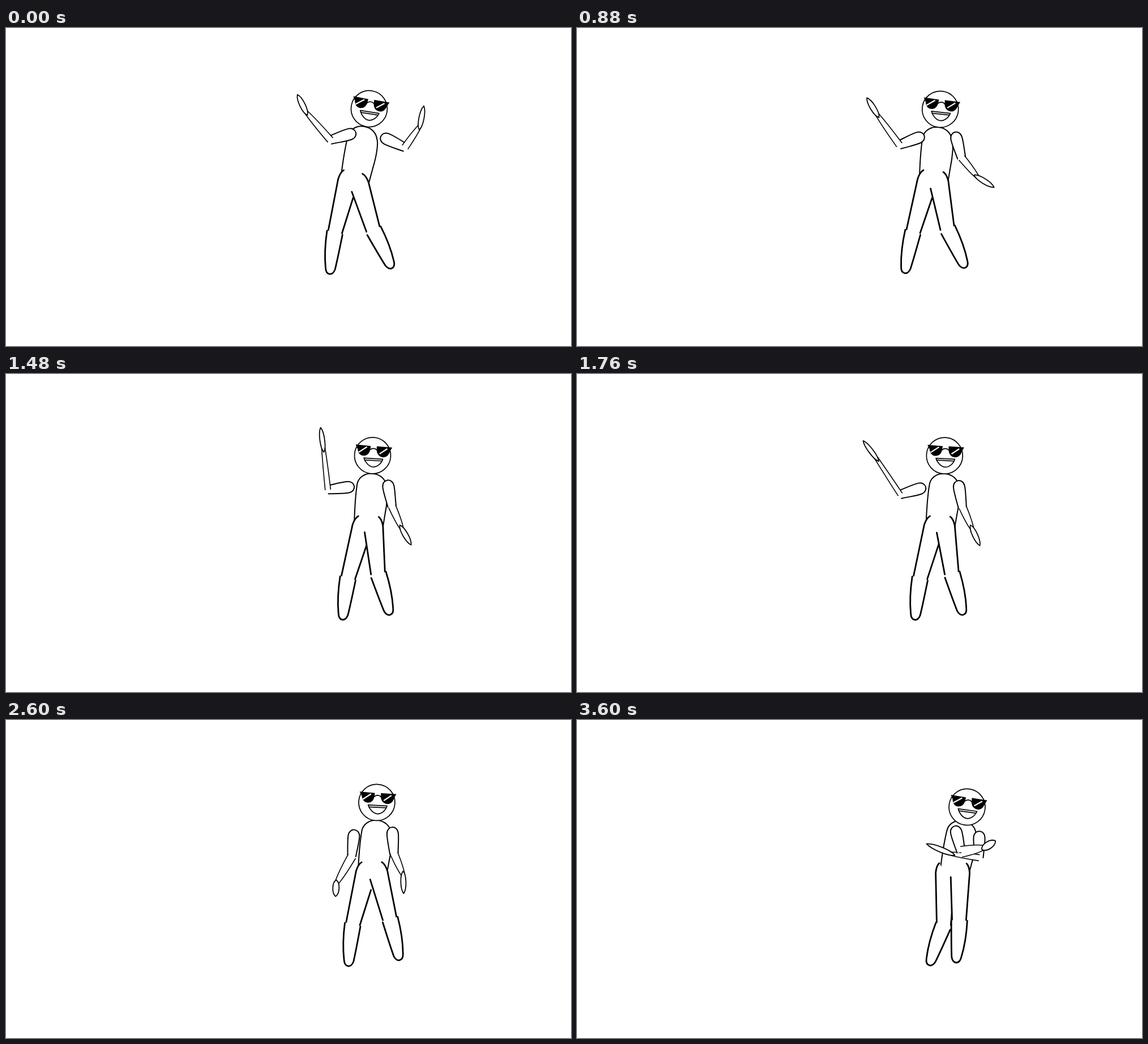
Recreate the animation shown at these times as an HTML page. Size 998 px wide and 561 px high, loop 3.64 s.

```html
<!DOCTYPE html>
<html lang="en">
<head>
<meta charset="utf-8">
<title>Dancing figure</title>
<style>
  html, body { margin: 0; width: 100%; height: 100%; overflow: hidden; background: #fff; }
  svg { display: block; width: 998px; height: 561px; }
  path, circle { fill: #fff; stroke: #000; stroke-linecap: round; stroke-linejoin: round; }
  .leg { stroke-width: 2.8; }
  .torso, .upper { stroke-width: 2; }
  .fore { stroke-width: 1.6; stroke-linecap: butt; }
  .hand { stroke-width: 1.8; }
  #head { stroke-width: 1.7; }
  .lens { fill: #000; stroke: none; }
  .glint { stroke: #fff; stroke-width: 2.2; stroke-linecap: butt; }
  .line { fill: none; }
  .bare { stroke: none; }
</style>
</head>
<body>
<svg viewBox="0 0 998 561">
  <g id="body"></g>
  <g id="head">
    <circle r="32"/>
    <path class="line" d="M-5 -10C-2 -13.5 4 -13.5 7 -10"/>
    <path class="lens" d="M-31.5 -17L-4.5 -16.5L-5 -10C-6 -2 -11 1.5 -16.5 1.5C-22.5 1.5 -26 -3 -27.5 -10Z"/>
    <path class="lens" d="M33.5 -17L6 -17L6.5 -10C7.5 -2 13 1.5 19 1.5C25 1.5 29 -4 30 -10Z"/>
    <path class="glint" d="M-25 -4L-11 -14.5M12 -4L25 -14"/>
    <path d="M-15 5.5L18.5 5C16 14 9 20 2.5 20C-5 20 -12 13 -15 5.5Z"/>
    <path class="line" d="M-13.5 8.8L17 8.3"/>
  </g>
  <g id="arms"></g>
</svg>
<script>
const LOOP = 3640, STEP = 40, END = 3600, RAD = Math.PI / 180;

// Key poses. Angles in degrees: 0 hangs down, 90 points right.
const times = [0, 600, 1160, 1760, 2600, 3080, END];
const keys = {
  headX:  [641.5, 639.3, 645.3, 649.3, 655, 641.5, 689],
  chestX: [634, 634.5, 644.5, 651, 657, 650, 683.5],
  hipX:   [604, 609.7, 627.8, 630.7, 635.7, 643, 649.3],
  thighL: [-12.9, -13.9, -14.7, -13.8, -13, -15.9, -0.8],
  shinL:  [-6.2, -13.3, -7.1, -6.3, -5.2, -12, -18.9],
  thighR: [16.3, 16.1, 3.1, 7, 13.4, 10.1, -2.1],
  shinR:  [24.8, 29.5, 16.7, 14.3, 12.2, 7.6, -5.4],
  xL:     [618, 613, 614, 616, 615.5, 639, 667],
  yL:     [184, 184, 196, 199, 193.5, 196.5, 187],
  upperL: [-73, -50, -87.5, -73, -5.5, 15.7, 14.4],
  foreL:  [-139, -149, -190, -146.6, -29.7, -3, 100.5],
  handL:  [-154, -160, -189.5, -143, -2, 17, 122],
  reachL: [66.6, 66.8, 69, 77, 56.4, 49, 43],
  xR:     [662, 661, 673.5, 673, 682, 683.5, 710.5],
  yR:     [191, 182, 186, 188, 189, 189.5, 196],
  upperR: [65.6, 20.6, 12.2, 9.7, 4.3, 9, 0],
  foreR:  [145, 69.5, 23.4, 23.7, 23, 31.5, -98],
  handR:  [169, 90, 37, 24.7, 1.5, 1.5, -112]
};

function slope(v, i) {
  const rate = k => (v[k + 1] - v[k]) / (times[k + 1] - times[k]);
  if (i === 0) return rate(0);
  if (i === v.length - 1) return rate(i - 1);
  const a = rate(i - 1), b = rate(i);
  return a * b <= 0 ? 0 : 2 * a * b / (a + b);
}

// Smooth curve through the keys without overshoot.
function sample(v, t) {
  let i = 0;
  while (i < v.length - 2 && t >= times[i + 1]) i++;
  const h = times[i + 1] - times[i], u = (t - times[i]) / h, w = 1 - u;
  return v[i] + (v[i + 1] - v[i]) * u * u * (3 - 2 * u) +
    h * u * w * (w * slope(v, i) - u * slope(v, i + 1));
}

function part(parent, cls) {
  const el = document.createElementNS('http://www.w3.org/2000/svg', 'path');
  el.setAttribute('class', cls);
  document.getElementById(parent).appendChild(el);
  return el;
}

function place(el, x, y, turn, flip = 1) {
  el.setAttribute('transform', `translate(${x} ${y}) rotate(${turn}) scale(${flip} 1)`);
}

// Hangs a shape at a joint and returns the joint at its far end.
function hang(el, [x, y], angle, len, d, flip) {
  place(el, x, y, -angle, flip);
  el.setAttribute('d', d);
  return [x + len * Math.sin(angle * RAD), y + len * Math.cos(angle * RAD)];
}

const hipCurve = 'M-9.5 -8C-14 -4 -15 2 -15.6 9';
const thigh = (l, inner) => `${hipCurve}L-12.4 ${l}M12.4 ${l}L17.5 ${inner}`;
const thighFill = (l, inner) => `${hipCurve}L-12.4 ${l}L12.4 ${l}L17.5 ${inner}Z`;
const shin = l =>
  `M-14.5 0C-15.5 ${l * .33} -13 ${l * .67} -10 ${l - 10.5}` +
  `C-8 ${l + 3} 4 ${l + 3.5} 7 ${l - 9.5}C9 ${l * .67} 11 ${l * .4} 13.4 4`;
const upper = l =>
  `M-7.5 ${l}C-9 ${l * .65} -10.5 20 -10 11C-9 -3.5 9 -3.5 10 11C10.5 20 8.5 ${l * .65} 7 ${l}`;
const fore = (l, w) =>
  `M${-w} 0C${-w * .95} ${l * .4} ${-w * .8} ${l * .75} -3 ${l}` +
  `Q0 ${l + 3} 3 ${l}C${w * .8} ${l * .75} ${w * .95} ${l * .4} ${w} 0`;
const hand = (l, w) => {
  const c = w * .67, a = -7 + l * .2, b = l * .75;
  return `M0 -7C${-c} ${a} ${-c} ${b} 0 ${l}C${c} ${b} ${c} ${a} 0 -7Z`;
};

const head = document.getElementById('head');
const torso = part('body', 'torso');
torso.setAttribute('d',
  'M-24.7 87C-26.5 60 -27 35 -26 20C-24 7 -12 0 0 0C13 0 22 8 25 17C30 26 30 50 28 70L26.5 94');
const [legL, legR] = [0, 1].map(() => ['leg bare', 'leg line', 'leg'].map(c => part('body', c)));
const [armR, armL] = [0, 1].map(() => ['upper', 'fore', 'hand'].map(c => part('arms', c)));

function drawLeg([fill, top, low], hip, a, b, len, inner, flip) {
  hang(fill, hip, a, len, thighFill(len, inner), flip);
  const knee = hang(top, hip, a, len, thigh(len, inner), flip);
  hang(low, knee, b, 75.5, shin(75.5), flip);
}

function drawArm([up, mid, end], shoulder, a, b, c, foreLen, handLen, foreW, handW) {
  const elbow = hang(up, shoulder, a, 47, upper(47));
  const wrist = hang(mid, elbow, b, foreLen, fore(foreLen, foreW));
  hang(end, wrist, c, handLen, hand(handLen, handW));
}

function draw(now) {
  const t = Math.floor(now / STEP) * STEP % LOOP;
  const p = {};
  for (const k in keys) p[k] = sample(keys[k], t);

  const u = t / END, slump = u ** 8;
  const gap = 20 + 9 * slump, roll = 20 * Math.exp(-((t / 900) ** 4)) * RAD;
  const lean = Math.atan2(p.chestX - p.hipX - gap / 2, 87) / RAD;

  place(torso, p.chestX, 174 + 4 * u, 1 + .8 * lean);
  place(head, p.headX, 142.5 + 3.3 * u + 7.7 * slump, 5.2 + .65 * (p.headX - p.chestX));

  const hip = [p.hipX, 260.8];
  drawLeg(legL, hip, p.thighL, p.shinL, 101, 36, 1);
  drawLeg(legR, [hip[0] + gap * Math.cos(roll), hip[1] + gap * Math.sin(roll)],
    p.thighR, p.shinR, 92, 17, -1);

  const lenR = 46 - 8 * u + 12 * slump;
  drawArm(armR, [p.xR, p.yR], p.upperR, p.foreR, p.handR,
    lenR, lenR * (.78 + .16 * slump), 5 + .15 * (53 - lenR), 9);

  // The left hand waves outward twice; it shortens as it turns to the viewer.
  const wave = t < 1160 ? (10 + t / 50) * Math.sin(Math.PI * t / 580) ** 2 : 0;
  const lenL = p.reachL, thick = .15 * (70 - lenL);
  const facing = Math.max(0, Math.cos(p.handL * RAD));
  drawArm(armL, [p.xL, p.yL], p.upperL, p.foreL + wave, p.handL + wave,
    lenL, lenL * (.5 - .11 * facing), 5.4 + thick, 9 + thick);
}

function tick() {
  draw(performance.now());
  requestAnimationFrame(tick);
}
draw(0);
requestAnimationFrame(tick);
</script>
</body>
</html>
```
